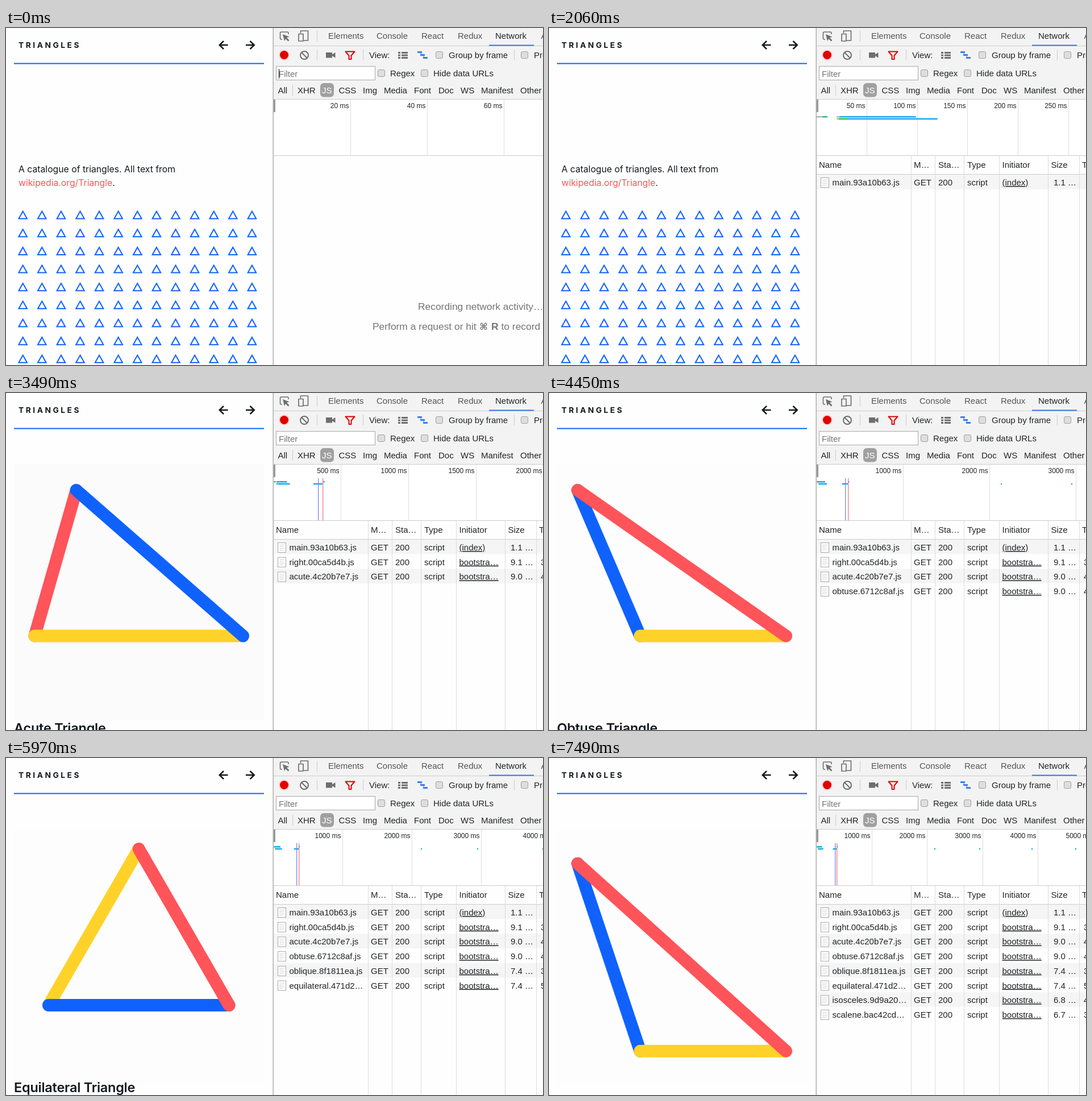
Write an HTML page that moves like this. It is 945 by 593 pixels and loops after 8000 ms.

```html
<!DOCTYPE html>
<html lang="en">
<head>
<meta charset="utf-8">
<title>Triangles</title>
<style>
  html, body { margin: 0; width: 100%; height: 100%; overflow: hidden; background: #fefefe; }
  svg { display: block; width: 945px; height: 593px; }
  text { white-space: pre; }
  .ui { font: 15px "Liberation Sans", Arial, sans-serif; }
  .page { font-family: Inter, sans-serif; }
</style>
</head>
<body>
<svg id="stage" viewBox="0 0 945 593" xmlns="http://www.w3.org/2000/svg"></svg>
<script>
const LOOP = 8000;
const BLUE = '#0f62fe', RED = '#ff5459', YELLOW = '#ffd229';
const DARK = '#14181f', INK = '#222426', GRAY = '#6e6e6e', MUTED = '#757575', RULE = '#cccccc';

const rect = (x, y, w, h, fill, extra = '') =>
  `<rect x="${x}" y="${y}" width="${w}" height="${h}" fill="${fill}" ${extra}/>`;
const text = (x, y, s, fill = INK, extra = '') => `<text x="${x}" y="${y}" fill="${fill}" ${extra}>${s}</text>`;
const stroke = (d, color, width = 1, extra = '') =>
  `<path d="${d}" fill="none" stroke="${color}" stroke-width="${width}" ${extra}/>`;
const repeat = (n, fn) => Array.from({ length: n }, (_, i) => fn(i)).join('');
const latest = (list, t) => list.filter(item => item.at <= t).pop();

// Left side: the page

const TRIANGLES = [
  { at: 2720, name: 'Right', points: [[50.4, 185.7], [50.4, 515.7], [417, 515.7]], colors: [BLUE, YELLOW, RED], titleY: 686 },
  { at: 3490, name: 'Acute', points: [[123.7, 171], [50.4, 427.5], [417, 427.5]], colors: [RED, YELLOW, BLUE], titleY: 598 },
  { at: 4450, name: 'Obtuse', points: [[50.4, 171], [160.4, 427.5], [417, 427.5]], colors: [BLUE, YELLOW, RED], titleY: 598 },
  { at: 5230, name: 'Oblique', points: [[343.7, 171], [50.4, 427.5], [417, 427.5]], colors: [RED, BLUE, YELLOW], titleY: 588 },
  { at: 5970, name: 'Equilateral', points: [[233.7, 160], [75, 435], [392.5, 435]], colors: [YELLOW, BLUE, RED], titleY: 588 },
  { at: 6840, name: 'Isosceles', points: [[233.7, 162], [87, 433], [380.4, 433]], colors: [RED, YELLOW, BLUE], titleY: 588 },
  { at: 7490, name: 'Scalene', points: [[50.4, 185.7], [160.4, 515.7], [417, 515.7]], colors: [BLUE, YELLOW, RED], titleY: 686 },
];

const pageHeader = () =>
  text(22, 34.5, 'TRIANGLES', DARK, 'font-size="13.8" font-weight="700" letter-spacing="3.5"') +
  stroke('M390.5 30H376M383 22.8L375.8 30L383 37.2M422 30H436.5M429.5 22.8L436.7 30L429.5 37.2', DARK, 2.6) +
  rect(14, 61.5, 440, 2, BLUE);

const home = () =>
  text(22, 254, 'A catalogue of triangles. All text from', DARK, 'font-size="15.75"') +
  text(22, 278, '<tspan fill="#ff5459">wikipedia.org/Triangle</tspan>.', DARK, 'font-size="15.75"') +
  repeat(9, row => repeat(13, col => {
    const x = 29.7 + 33.6 * col, y = 329 + 31.65 * row;
    return stroke(`M${x} ${y - 6.4}L${x + 7.3} ${y + 6.6}H${x - 7.3}Z`, BLUE, 2);
  }));

function triangle({ name, points, colors, titleY }) {
  const sides = colors.map((color, i) => {
    const [a, b] = [points[i], points[(i + 1) % 3]];
    return stroke(`M${a}L${b}`, color, 22, 'stroke-linecap="round"');
  }).join('');
  return rect(14, 125, 440, 450, name === 'Acute' ? '#fbfbfb' : '#fdfdfd') + sides +
    text(14, titleY, name + ' Triangle', DARK, 'font-size="23.5" font-weight="600" letter-spacing="-.25"');
}

function page(t) {
  if (t >= 690 && t < 1100) return '';
  const shape = latest(TRIANGLES, t);
  return pageHeader() + (shape ? triangle(shape) : home());
}

// Right side: the toolbars

const checkbox = (x, y) => rect(x + .5, y + .5, 12, 12, '#dedede', 'rx="2.5" stroke="#a0a0a0"');
const divider = (x, y) => rect(x, y, 1, 19, RULE);
const labels = (y, fill, items) => items.map(([x, s]) => text(x, y, s, fill)).join('');

function toolbars() {
  const icons =
    stroke('M486 20H484.5Q482.5 20 482.5 18V9Q482.5 7 484.5 7H495Q497 7 497 9V11', GRAY, 1.6) +
    `<path d="M487 11L498.5 15.5L494 17L498.5 21.5L496.5 23.5L492 19L490 23Z" fill="${GRAY}"/>` +
    stroke('M518.5 9V5H531.5V22H524M515 10.5H523V23H515Z', GRAY, 1.7) +
    '<circle cx="489.5" cy="47.5" r="9.5" fill="#f9d4d4"/><circle cx="489.5" cy="47.5" r="7.5" fill="#e00000"/>' +
    '<circle cx="525" cy="48" r="7" fill="none" stroke="#6e6e6e" stroke-width="2"/>' +
    stroke('M520 43L530 53', GRAY, 2) +
    `<path d="M563 43H574V46.5L579.5 43V52.5L574 49V52.5H563Z" fill="${GRAY}"/>` +
    stroke('M597.5 41.5H613.5L607.5 48.5V55H603.5V48.5Z', '#e00000', 2) +
    repeat(3, i => rect(690, 42 + 4.5 * i, 4, 3, GRAY) + rect(696, 42 + 4.5 * i, 11, 3, GRAY)) +
    repeat(3, i => rect(724 + 5 * i, 41 + 5 * i, 8, 3, '#3b7df0')) +
    stroke('M730 44V47.5M735 49V52.5', '#3b7df0');
  return rect(471, 0, 474, 125, '#f3f3f3') + rect(471, 31, 474, 1, RULE) + rect(850, 29.5, 79, 2, '#3879e8') + icon_group(icons) +
    [[547, 5], [547, 38], [628, 38], [894, 38], [504, 100]].map(p => divider(...p)).join('') +
    [[756, 41], [906, 41], [654, 73], [730, 73]].map(p => checkbox(...p)).join('') +
    labels(19, '#555', [[567, 'Elements'], [652, 'Console'], [731, 'React'], [795, 'Redux'], [941.5, 'Application']]) +
    text(861, 19, 'Network') +
    labels(53, INK, [[639, 'View:'], [779, 'Group by frame'], [929, 'Preserve log']]) +
    rect(475.5, 67.5, 174, 24, '#fff', 'stroke="#a9a9a9"') + text(480, 86, 'Filter', MUTED) +
    labels(85, INK, [[676, 'Regex'], [752, 'Hide data URLs']]) +
    rect(553, 97, 24, 24.5, '#a0a0a0', 'rx="6"') + text(556, 115, 'JS', '#fff') +
    labels(115, INK, [[478.5, 'All'], [513, 'XHR'], [585.5, 'CSS'], [628, 'Img'], [665, 'Media'], [718, 'Font'],
      [761, 'Doc'], [800, 'WS'], [836, 'Manifest'], [905, 'Other']]);
}

function icon_group(icons) {
  return `<g stroke-linejoin="round">${icons}</g>`;
}

// Right side: the timeline. Its range grows by a quarter each time it overflows.

const RANGES = [[0, 0], [860, 4], [980, 5], [1100, 6], [2720, 14], [3490, 15], [4450, 17], [5970, 18], [6930, 19]]
  .map(([at, growth]) => ({ at, growth }));
const WAIT = '#b5b5b5', OPEN = '#17c157', LOAD = '#1aa7ee';
const TOP_ROW = 155, LOW_ROW = 158.7;
const BARS = [
  [0, 5.8, TOP_ROW, WAIT], [5.8, 9.4, TOP_ROW, OPEN], [9.4, 10.8, TOP_ROW, LOAD],
  [19.9, 22.7, TOP_ROW, WAIT], [22.7, 98.6, TOP_ROW, LOAD],
  [19.9, 22, LOW_ROW, WAIT], [22, 31, LOW_ROW, OPEN], [31, 120, LOW_ROW, LOAD],
  [294, 361, LOW_ROW, LOAD], [367, 377, TOP_ROW, LOAD],
];
const REQUESTS = [2134, 2947, 3895, 4682];

function timeline(t) {
  const scale = 676 / (100 * 1.25 ** latest(RANGES, t).growth);
  const toX = ms => 471 + ms * scale;
  const decade = 10 ** Math.floor(Math.log10(80 / scale));
  const step = decade * [1, 2, 5, 10].find(n => n * decade * scale >= 80);
  const ticks = repeat(6, i => {
    const ms = step * (i + 1), x = Math.floor(toX(ms));
    return rect(x, 126, 1, 98, '#dedede') + text(x - 2.5, 141, ms + ' ms', INK, 'font-size="12" text-anchor="end"');
  });
  const known = t < 780 ? 0 : t < 860 ? 12 : Infinity;
  const bars = BARS.filter(bar => bar[1] <= known)
    .map(([from, to, y, color]) => rect(toX(from), y, Math.max(1.5, (to - from) * scale), 2.5, color)).join('');
  const eventLine = (ms, color) => rect(Math.floor(toX(ms)), 150, 1.3, 74, color);
  const later = t < 2720 ? '' :
    REQUESTS.map(ms => rect(Math.floor(toX(ms) - .5), LOW_ROW, 2, 2.5, LOAD)).join('') +
    eventLine(332, '#8580ee') + eventLine(365, '#ee8080');
  return rect(471, 125, 474, 100, '#fff') + ticks + bars + later +
    rect(471, 126, 3, 22, '#999') + rect(471, 125, 474, 1, RULE) + rect(471, 224, 474, 1, RULE);
}

// Right side: the request table

const FILES = [
  [780, 'main.93a10b63.js', '1.1', ''], [2720, 'right.00ca5d4b.js', '9.1', 3],
  [3490, 'acute.4c20b7e7.js', '9.0', 4], [4450, 'obtuse.6712c8af.js', '9.0', 4],
  [5230, 'oblique.8f1811ea.js', '7.4', 3], [5970, 'equilateral.471d2…', '7.4', 5],
  [6840, 'isosceles.9d9a20…', '6.8', 4], [7490, 'scalene.bac42cd…', '6.7', 3],
];

function tableRow([, name, size, time], i) {
  const y = 258 + 25.7 * i, base = y + 19;
  const icon = rect(478.5, y + 5.5, 14, 17, '#fff', 'stroke="#a8a8a8"') +
    repeat(4, n => rect(481, y + 9 + 3 * n, n % 2 ? 7 : 9, 1, '#d4d4d4'));
  return rect(471, y, 474, 25.7, i % 2 ? '#fefefe' : '#f5f5f5') + icon +
    labels(base, INK, [[498.5, name], [642, 'GET'], [685, 200], [736, 'script'], [888, size + ' …'], [941, time]]) +
    text(797.5, base, i ? 'bootstra…' : '(index)', INK, 'text-decoration="underline"');
}

const hint = () => rect(471, 225, 474, 368, '#fefefe') +
  '<g font-size="17.4">' +
  text(725, 496, 'Recording network activity…', MUTED) +
  text(645, 530.5, 'Perform a request or hit', MUTED) +
  text(833, 530.5, '⌘', MUTED, 'font-family="DejaVu Sans, sans-serif" font-weight="700" font-size="16"') +
  text(854, 530.5, 'R', MUTED, 'font-weight="700"') +
  text(871.5, 530.5, 'to record the reload.', MUTED) + '</g>';

function table(t) {
  if (t < 600) return hint();
  return rect(471, 225, 474, 368, '#fefefe') + rect(471, 257, 474, 1, RULE) +
    labels(246, INK, [[475, 'Name'], [642, 'M…'], [685, 'Sta…'], [736, 'Type'], [797.5, 'Initiator'], [883.5, 'Size'], [938, 'Time']]) +
    FILES.filter(file => file[0] <= t).map(tableRow).join('') +
    [637, 679, 730, 792, 878, 933].map(x => rect(x, 225, 1, 368, '#dcdcdc')).join('');
}

const caret = t => t < 330 || (t >= 860 && t < 1310) || (t >= 1820 && t < 2060) ? rect(480, 72, 1, 17, '#000') : '';

const stage = document.getElementById('stage');
const CUTS = [0, 330, 600, 690, 780, 860, 980, 1100, 1310, 1820, 2060, 2720, 3490, 4450, 5230, 5970, 6840, 6930, 7490];
const fixed = toolbars();
let shown = -1;

function draw(t) {
  const cut = CUTS.filter(c => c <= t).pop();
  if (cut === shown) return;
  shown = cut;
  stage.innerHTML = rect(0, 0, 945, 593, '#fefefe') + `<g class="page">${page(cut)}</g>` +
    `<g class="ui">${fixed}${timeline(cut)}${table(cut)}${caret(cut)}</g>` + rect(469.5, 0, 1.5, 593, '#adadad');
}

const start = performance.now();
function tick() {
  draw((performance.now() - start) % LOOP);
  requestAnimationFrame(tick);
}
tick();
</script>
</body>
</html>
```
